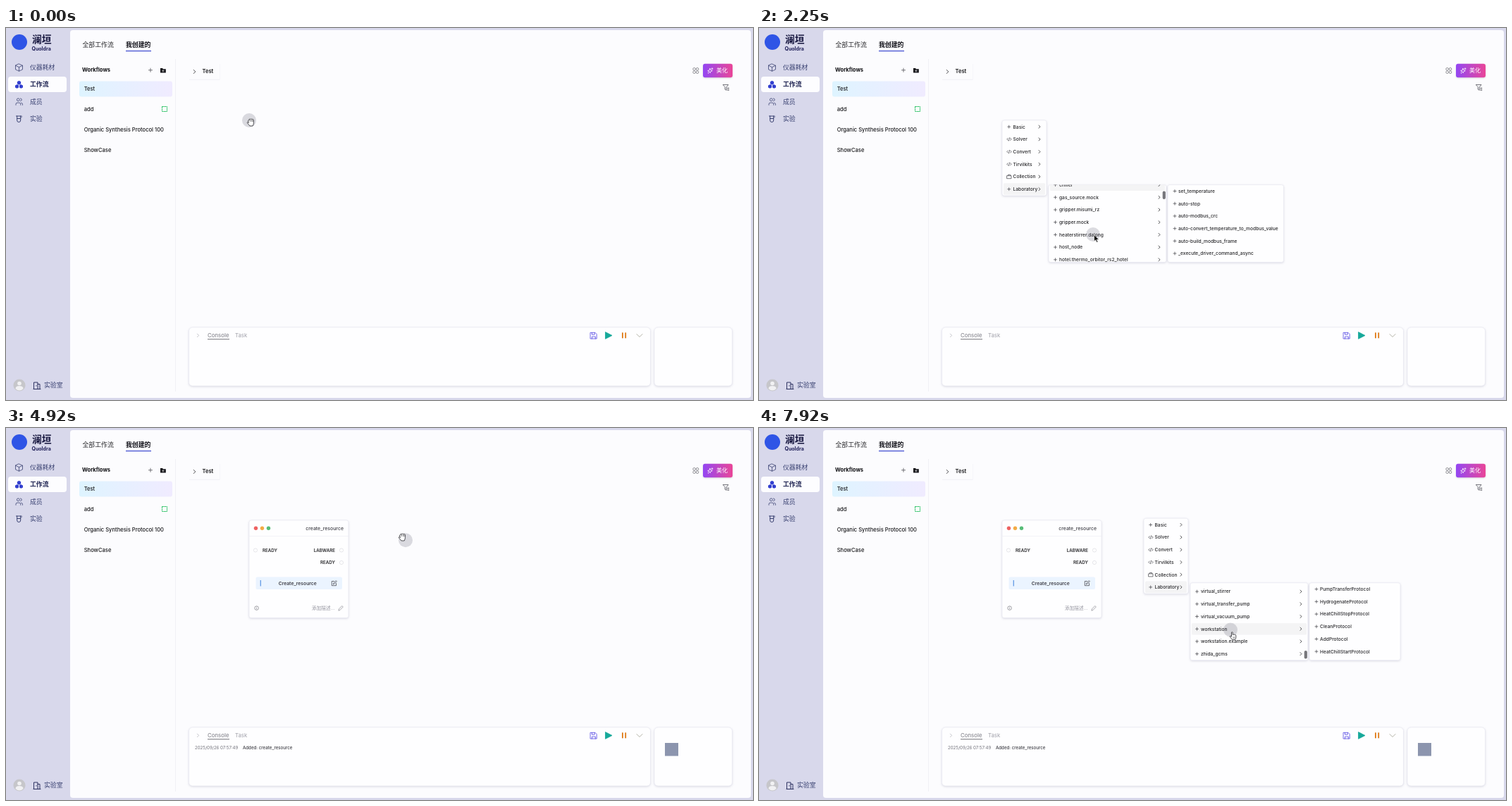
An HTML page for the animation above (8 s loop, 1060 by 528 pixels).

```html
<!DOCTYPE html>
<html lang="zh-CN">
<head>
<meta charset="utf-8">
<title>Workflow editor</title>
<style>
  html, body { margin: 0; width: 100%; height: 100%; overflow: hidden; background: #d8d8eb; }
  svg { display: block; width: 100%; height: 100%; }
  text { font-family: Inter, "Noto Sans CJK SC", "Noto Sans CJK", sans-serif; white-space: pre; }
  .card { fill: #fefeff; stroke: #e6e6f0; stroke-width: .6; filter: drop-shadow(0 1px 1.5px #22225026); }
</style>
</head>
<body>
<svg viewBox="0 0 1060 528">
  <defs>
    <linearGradient id="selected"><stop stop-color="#def4ff"/><stop offset="1" stop-color="#f0ebff"/></linearGradient>
    <linearGradient id="button"><stop stop-color="#9347f3"/><stop offset="1" stop-color="#ea4698"/></linearGradient>
    <clipPath id="listView"><rect x="411" y="222.5" width="167" height="110"/></clipPath>
  </defs>
  <g id="page"></g>
  <g id="scene"></g>
</svg>
<script>
const LOOP = 8000, TICKS_PER_MS = 12 / 1000, ROW = 17.7;
const INK = '#27272a', NAVY = '#3a4272';

const text = (x, cy, str, size = 6.66, weight = 500, fill = INK, anchor = 'start') =>
  `<text x="${x}" y="${cy + size * .36}" font-size="${size}" font-weight="${weight}" fill="${fill}" text-anchor="${anchor}">${str}</text>`;
const rect = (x, y, w, h, fill, r = 0) =>
  `<rect x="${x}" y="${y}" width="${w}" height="${h}" rx="${r}" fill="${fill}"/>`;
const card = (x, y, w, h, r = 3) =>
  `<rect class="card" x="${x}" y="${y}" width="${w}" height="${h}" rx="${r}"/>`;
const line = (d, color = INK, width = .8, extra = '') =>
  `<path d="${d}" fill="none" stroke="${color}" stroke-width="${width}" stroke-linecap="round" stroke-linejoin="round" ${extra}/>`;
const shape = (d, fill, extra = '') => `<path d="${d}" fill="${fill}" ${extra}/>`;
const circle = (x, y, r, fill, extra = '') => `<circle cx="${x}" cy="${y}" r="${r}" fill="${fill}" ${extra}/>`;
const chevron = (x, y, color = INK, s = 1) => line(`M${x - s} ${y - 2 * s}l${2 * s} ${2 * s}l${-2 * s} ${2 * s}`, color);
const plus = (x, y, s = 2, color = '#3f3f46') => line(`M${x - s} ${y}h${2 * s}M${x} ${y - s}v${2 * s}`, color, .7);

function page() {
  const nav = [
    [56, '仪器耗材', line('M18.5 51l5 2.3v5.6l-5 2.3l-5-2.3v-5.6zM13.5 53.3l5 2.3l5-2.3M18.5 55.6v5.6', NAVY)],
    [80, '工作流', shape('M18.5 74.8l2.6 1.5v3l-2.6 1.5l-2.6-1.5v-3zM16 80l2 1.3v3.2l-2.4 1.3l-2.6-1.4v-3zM21 80l3 1.4v3l-2.6 1.4l-2.4-1.3v-3.2z', '#3340cf')],
    [104.5, '成员', line('M14 109.3v-1.2q0-2 2-2h2.800q2 0 2 2v1.200M21.700 106.200q1.800.3 1.800 2v1.100M20.500 99.900q2 .4 1.800 2.100q-.2 1.500-1.800 1.700', NAVY)
      + circle(17.3, 101.800, 1.900, 'none', `stroke="${NAVY}" stroke-width=".8"`)],
    [129, '实验', line('M14.500 125h7.500M15.700 125v6q0 2.600 2.500 2.600t2.500-2.600v-6M15.700 128.500h5M21.500 127l1-1', NAVY, 1)]
  ];
  const workflows = [[86.5, 'Test'], [115, 'add'], [144, 'Organic Synthesis Protocol 100'], [173, 'ShowCase']];
  const diamonds = [[976.6, 58.3], [981, 58.3], [976.6, 62.7], [981, 62.7]];
  return rect(91, 3, 966, 522, '#fcfcfe', 4)
    + circle(19, 20, 11, '#2f55e6')
    + text(37, 16.5, '澜垣', 13.8, 700, '#16163f') + text(36.500, 29.3, 'Quoldra', 7, 700, '#20205a')
    + rect(3, 69, 83, 22, '#fdfdff', 4)
    + nav.map(([y, label, icon], i) => icon + text(34, y, label, 8.9, i === 1 ? 700 : 400, i === 1 ? '#1f2452' : NAVY)).join('')
    + circle(19, 507, 8.500, '#c6c6ca') + circle(19, 504.500, 2.800, '#f1f1f3') + shape('M13.500 512q0-4 5.500-4t5.500 4q-5.500 5-11 0z', '#f1f1f3')
    + line('M39.500 512.500v-9.500h5.500v9.500M45 505.500h3v7M39 512.500h10M43 507.500v.5', '#2c3160', 1)
    + text(54, 507, '实验室', 8.900, 400, NAVY)
    + text(108.5, 23.5, '全部工作流', 8.9, 400) + text(170, 23.5, '我创建的', 8.9, 600, '#111118')
    + rect(170, 32, 36, 1.2, '#3b48cf')
    + text(108, 59.3, 'Workflows', 7.6, 700, '#101014') + plus(205, 59.800, 2.600)
    + shape('M219 57h3l1 1.200h3.800v5.300h-7.800z', '#15151a') + line('M222.900 59.500v2.600M221.600 60.800h2.600', '#fff', .6)
    + rect(104, 75.5, 132, 22, 'url(#selected)', 3)
    + workflows.map(([y, name]) => text(110.7, y, name, 7.6, 500, '#18181b')).join('')
    + line('M221.500 111.500h7v7h-7z', '#35c46c', 1, 'stroke-dasharray="2 1.2"')
    + rect(240.2, 44, .7, 472, '#ebebf3')
    + rect(260, 72.8, 43.500, .7, '#ececf2') + rect(303, 51, .6, 22, '#f4f4f8')
    + chevron(267.5, 62, INK, 1.3) + text(278.5, 61.700, 'Test', 7.6, 600, '#18181b')
    + diamonds.map(([x, y]) => circle(x, y, 1.8, 'none', 'stroke="#66666d" stroke-width=".7"')).join('')
    + `<g style="filter:drop-shadow(0 1px 1px #0002)">${rect(989, 50.7, 42, 19.6, 'url(#button)', 3)}</g>`
    + line('M999 57.500l1 2.200l2.300 1l-2.300 1l-1 2.200l-1-2.200l-2.300-1l2.300-1zM1002 56.800v2M1001 57.800h2M996.500 63v1.400', '#fff', .8)
    + text(1008, 60.5, '美化', 8, 500, '#fff')
    + line('M1017.500 80.500h7.500l-2.800 3.500v4.300l-2-1.200v-3.100zM1023.800 85h2M1023.800 86.700h2M1023.800 88.400h2', '#52525b')
    + card(259.5, 425, 655, 83, 5) + card(920, 425, 110.500, 83, 5)
    + chevron(272.5, 436.3, '#b5b5bd', 1.1)
    + text(286, 436, 'Console', 7.77, 500, '#8c8c94') + rect(286, 441.3, 31, .9, '#66666c')
    + text(325, 436, 'Task', 7.77, 400, '#a1a1aa')
    + line('M829.500 432.300h6.500l2.200 2.200v6.500h-8.700zM831.500 432.500v2.700h3.700v-2.700M831.500 441v-3h4.800v3', '#6257e6', .9)
    + shape('M850.500 431.500l9.500 4.900l-9.500 4.900z', '#16a99a', 'stroke="#16a99a" stroke-linejoin="round" stroke-width=".8"')
    + rect(874, 432.3, 1.8, 8, '#df7b16') + rect(878.300, 432.3, 1.8, 8, '#df7b16')
    + line('M895 434.500l4 4l4-4', '#aaa99b', .9);
}

function node() {
  const lights = ['#ee6262', '#f3ab45', '#58bd78'];
  const ports = [[354, 173.5], [476, 173.5], [476, 191]];
  return card(345, 131, 141, 138.5)
    + lights.map((c, i) => circle(354.5 + 9 * i, 142.2, 2.7, c)).join('')
    + text(479, 142.3, 'create_resource', 6.95, 500, '#3f3f46', 'end')
    + line('M345.500 153.500h140', '#ededf3', .6)
    + ports.map(([x, y]) => circle(x, y, 2.6, '#fff', 'stroke="#d5d5dc" stroke-width=".6"')).join('')
    + text(364, 173.7, 'READY', 6.2, 600) + text(467, 173.7, 'LABWARE', 6.2, 600, INK, 'end')
    + text(467, 191.2, 'READY', 6.2, 600, INK, 'end')
    + rect(354.500, 211.5, 122.500, 17.500, '#ebf4ff', 2) + rect(360.700, 216, 1.100, 8.5, '#4b8be0')
    + text(413.700, 220.4, 'Create_resource', 6.75, 600, '#3f3f46', 'middle')
    + line('M465.500 217.500h-3.200v6.200h6.200v-3.200M464.500 221.500l.3-1.400l3.500-3.500l1.100 1.100l-3.500 3.500z', '#3f3f46', .75)
    + circle(355.6, 255.6, 2.8, 'none', 'stroke="#77777f" stroke-width=".7"') + line('M355.600 255.400v1.500M355.600 254v.1', '#77777f', .6)
    + text(434, 255.600, '添加描述...', 6.7, 400, '#9696a0')
    + line('M472 258.800l.5-2l4.300-4.300l1.500 1.500l-4.300 4.300z', '#85858d', .7);
}

const logEntry = () => text(268, 453.5, '2025/09/26 07:57:49', 6.1, 400, '#71717a')
  + text(336, 453.5, 'Added: create_resource', 6.15, 500, '#3f3f46')
  + rect(935, 447, 19, 18.5, '#8c95ae');

const groups = ['Basic', 'Solver', 'Convert', 'Tirvilkits', 'Collection', 'Laboratory'];
const devices = `agv.SEER bettery_station_registry camera.USB chiller gas_source.mock gripper.misumi_rz gripper.mock
  heaterstirrer.dalong host_node hotel.thermo_orbitor_rs2_hotel hplc.agilent linear_motion.grbl linear_motion.sim
  liquid_handler liquid_handler.mock moveit.arm_slider moveit.xyz opcua_example post_process_station robotic_arm.mock
  robotic_arm.slider rotavap.one separator.homemade solenoid_valve solenoid_valve.mock solid_dispenser syringe_pump.T06
  syringe_pump.T08 temp_controller virtual_centrifuge virtual_column virtual_filter virtual_gas_source virtual_heatchill
  virtual_multiway_valve virtual_rotavap virtual_separator virtual_solenoid_valve virtual_stirrer virtual_transfer_pump
  virtual_vacuum_pump workstation workstation.example zhida_gcms`.split(/\s+/);
devices.splice(devices.indexOf('virtual_stirrer'), 0, 'virtual_solid_dispenser');
const actions = {
  chiller: [164.5, 'set_temperature', 'auto-stop', 'auto-modbus_crc', 'auto-convert_temperature_to_modbus_value',
    'auto-build_modbus_frame', '_execute_driver_command_async'],
  host_node: [102, 'test_latency', 'create_resource', 'create_resource_detailed'],
  workstation: [129, 'PumpTransferProtocol', 'HydrogenateProtocol', 'HeatChillStopProtocol', 'CleanProtocol',
    'AddProtocol', 'HeatChillStartProtocol']
};

const codeIcon = y => line(`M353.400 ${y - 1.6}l-1.600 1.600l1.600 1.600M356.600 ${y - 1.6}l1.600 1.600l-1.600 1.600M355.600 ${y - 2.200}l-1.200 4.400`, '#3f3f46', .7);
const caseIcon = y => line(`M352 ${y - 1.3}h6v4h-6zM353.500 ${y - 1.5}v-1.300h3v1.300`, '#3f3f46', .7);
const groupIcon = (i, y) => i === 4 ? caseIcon(y) : i % 5 ? codeIcon(y) : plus(354.7, y);

function menus({ hover, list, open, scroll, pointer }) {
  let out = card(345, 131, 63, 107);
  if (hover >= 0) out += rect(347, 131.8 + hover * ROW, 59, 16.5, '#f4f4f5', 1.5);
  groups.forEach((name, i) => {
    const y = 140.2 + i * ROW;
    out += groupIcon(i, y) + text(360.5, y, name) + chevron(398, y);
  });
  if (!list) return out;

  out += card(411, 222.5, 167, 110) + '<g clip-path="url(#listView)">';
  devices.forEach((name, i) => {
    const y = 231.5 + i * ROW - scroll;
    if (y < 212 || y > 343) return;
    if (name === open) out += rect(413, y - 8.3, 163, 16.6, '#f4f4f5', 1.5);
    out += plus(420.5, y) + text(426, y, name) + chevron(568, y);
  });
  if (scroll) out += rect(572.7, 222.7 + scroll * .14, 4.2, 11.5, '#77777c', 2);
  out += '</g>';

  if (open) {
    const [width, ...names] = actions[open];
    out += card(580, 222.5, width, 110);
    if (pointer[0] > 585 && open === 'host_node') out += rect(582, 241, width - 4, 16.5, '#f4f4f5', 1.5);
    names.forEach((name, i) => {
      const y = 231.5 + i * ROW;
      out += plus(590, y) + text(595, y, name);
    });
  }
  return out;
}

const outline = 'stroke="#26262b" stroke-width=".8" stroke-linejoin="round"';
const cursors = {
  grab: shape('M-2.500 1.500l-1-3q.3-1.300 1.500-.4v-1.500q.7-1.100 1.500 0q.7-1.300 1.700-.1q1-.9 1.700.3q1.300-.5 1.500.8v4q0 2-1.200 4.400h-4.200l-3.600-4.300q-.3-1.400 1.100-.8z', '#fff', outline + ' transform="translate(2 2)"')
    + line('M1.500-.5v2M3.700-.5v2M5 0v1.700', '#26262b', .6),
  hand: shape('M1.500 3.500q.9-1 1.700 0v3.400q.9-.8 1.500 0q1-.7 1.600.2q1.200-.4 1.500.8v2.700q0 1.700-1.100 3.200h-4.300l-3.200-4.300q.1-1.400 1.400-.7l.9.900z', '#fff', outline)
    + line('M4 10v2M5.700 10v2', '#26262b', .5),
  arrow: shape('M1.500.5v9.300l2.200-2l1.600 3.500l1.600-.7l-1.600-3.400h3z', '#111', 'stroke="#fff" stroke-width=".6"')
};

// Keys are [tick, value...]; twelve ticks make one second.
const path = [[0, 345, 131], [5, 345, 131], [7, 350, 150], [9, 371, 200], [10, 383, 231], [16, 383, 231], [18, 415, 250],
  [21, 452, 283], [25, 474, 293], [31, 474, 293], [35, 474, 286.5], [40, 474, 286.5], [42, 600, 258], [45, 668, 247],
  [56, 668, 247], [57, 588, 181], [59, 560, 152], [61, 546, 128], [65, 546, 128], [68, 560, 176], [70, 560, 176],
  [74, 587, 231.5], [75.500, 587, 231.5], [77, 650, 281], [80, 650, 281], [85, 669, 286.5], [96, 669, 286.5]];
const scrolls = [[0, 0], [22, 0], [27, 62], [30, 68], [35, 91], [59, 91], [60, 0], [80, 0], [93, 686.9], [96, 686.9]];
const openDevice = [[0, ''], [21, 'chiller'], [35, 'host_node'], [47, ''], [77, 'chiller'], [92, 'workstation']];
const pointers = [[0, 'grab'], [5, 'arrow'], [7, 'hand'], [23, 'arrow'], [35, 'hand'], [47, 'grab'], [63, 'arrow'],
  [67, 'hand'], [81, 'arrow'], [95, 'hand']];

const latest = (keys, t) => keys.findLast(key => key[0] <= t)[1];
function tween(keys, t) {
  const i = Math.max(1, keys.findIndex(key => key[0] >= t));
  const [t0, ...a] = keys[i - 1], [t1, ...b] = keys[i];
  const k = Math.max(0, (t - t0) / (t1 - t0));
  return a.map((v, j) => v + (b[j] - v) * k);
}

function scene(tick) {
  const moveTick = Math.max(0, 2 * Math.floor((tick + 1) / 2) - 1);
  const pointer = tween(path, moveTick), halo = tween(path, Math.max(0, moveTick - .5));
  const second = tick >= 63;
  let out = '';
  if (tick >= 47) out += node();
  if (tick >= 49) out += logEntry();
  if (second || tick >= 5 && tick < 47) {
    const [dx, dy] = second ? [201, -2.8] : [0, 0];
    const list = second ? tick >= 75 : tick >= 11;
    const row = Math.floor((pointer[1] - dy - 131.5) / ROW);
    out += `<g transform="translate(${dx} ${dy})">` + menus({
      list, hover: list ? 5 : Math.min(row, 5), open: latest(openDevice, tick),
      scroll: tween(scrolls, moveTick)[0], pointer
    }) + '</g>';
  }
  return out + circle(...halo, 10, '#60607038')
    + `<g transform="translate(${pointer})">${cursors[latest(pointers, tick)]}</g>`;
}

document.getElementById('page').innerHTML = page();
const stage = document.getElementById('scene');
let shown = -1;
function frame() {
  const tick = Math.floor(performance.now() % LOOP * TICKS_PER_MS + 1e-6);
  if (tick !== shown) stage.innerHTML = scene(shown = tick);
  requestAnimationFrame(frame);
}
frame();
</script>
</body>
</html>
```
